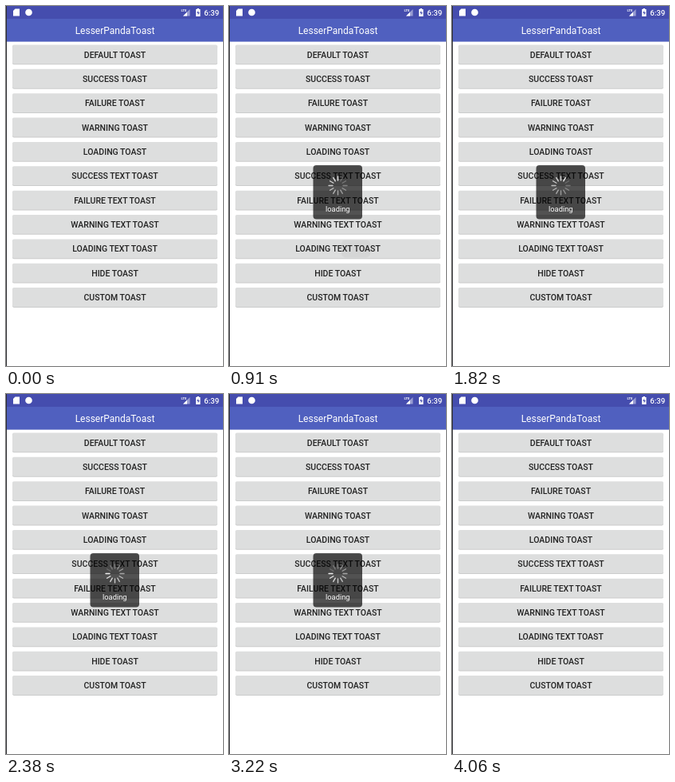
An HTML page for the animation above (4480 ms loop, 272 px wide and 450 px high).

```html
<!DOCTYPE html>
<html lang="en">
<head>
<meta charset="utf-8">
<title>LesserPandaToast</title>
<style>
  html, body { margin: 0; width: 100%; height: 100%; overflow: hidden; background: #fff; }
  svg { display: block; width: 100%; height: 100%; }
  text { font-family: Roboto, sans-serif; text-anchor: middle; }
  .label { font-size: 10.5px; font-weight: 500; fill: #222; }
  .light { fill: #fff; }
</style>
</head>
<body>
<svg viewBox="0 0 272 450">
  <defs>
    <filter id="lift" x="-5%" y="-30%" width="110%" height="170%">
      <feDropShadow dx="0" dy="1" stdDeviation="1.8" flood-color="#000" flood-opacity=".22"/>
    </filter>
  </defs>
  <rect width="272" height="450" fill="#fff"/>
  <rect width="272" height="44.600" fill="#5060bf"/>
  <rect width="272" height="16" fill="#454dae"/>
  <rect width="1" height="450" fill="#2a2a2e"/>

  <g class="light">
    <path d="M11.500 3.500h5.500v9H9V6z"/>
    <circle cx="28.500" cy="8" r="4.300"/>
    <path d="M222 12.500L230.500 4v8.500z" opacity=".45"/>
    <path d="M222 12.500L227 7.500v5z"/>
    <path d="M239.500 3h2.500v1h1.500v9h-5.500V4h1.500z"/>
    <path d="M241.200 5.500l-2 3.500h1.500v2.500l2-3.500h-1.500z" fill="#454dae"/>
    <text x="223" y="7.300" font-size="4.400" font-weight="700">LTE</text>
    <text x="257.800" y="11.700" font-size="9.600" font-weight="500">6:39</text>
    <text x="136.500" y="34.700" font-size="12">LesserPandaToast</text>
  </g>

  <g id="buttons"></g>
  <rect id="ripple" x="141" y="292.500" width="36" height="22" rx="5" fill="#000"/>

  <g id="toast">
    <rect x="105.500" y="199" width="61.500" height="67.600" rx="4" fill="#000" opacity=".68"/>
    <g id="spinner" stroke="#fff" stroke-width="1.400" stroke-linecap="round"></g>
    <text class="light" x="136.300" y="256.700" font-size="9.300">loading</text>
  </g>
</svg>
<script>
const LOOP = 4480, STEP = 70, SHOW = 910, HIDE = 3570, SPOKES = 12;
const $ = id => document.getElementById(id);

const labels = ["DEFAULT", "SUCCESS", "FAILURE", "WARNING", "LOADING", "SUCCESS TEXT",
  "FAILURE TEXT", "WARNING TEXT", "LOADING TEXT", "HIDE", "CUSTOM"];

$("buttons").innerHTML = labels.map((label, i) => `
  <g class="button" transform="translate(0 ${48.5 + i * 30.36})">
    <rect x="8" y="1" width="257" height="23.800" rx="1.800" fill="#cbcccc"/>
    <rect x="8" width="257" height="23.800" rx="1.800" fill="#dddede"/>
    <text class="label" x="136.500" y="16">${label} TOAST</text>
  </g>`).join("");

$("spinner").innerHTML = Array.from({ length: SPOKES }, (_, i) =>
  `<path d="M0-6.500V-11.500" transform="rotate(${i * 360 / SPOKES})" opacity="${0.2 + 0.7 * i / (SPOKES - 1)}"/>`
).join("");

const hideButton = document.querySelectorAll(".button")[labels.indexOf("HIDE")];
const within = (t, from, to) => t >= from && t < to;

function draw(now) {
  const t = Math.floor(now % LOOP / STEP) * STEP;
  const turn = 30 + (t - SHOW) / STEP * 360 / SPOKES;
  $("toast").style.display = within(t, SHOW, HIDE) ? "" : "none";
  $("spinner").setAttribute("transform", `translate(136.500 224.500) rotate(${turn % 360})`);
  $("ripple").setAttribute("opacity", within(t, SHOW, SHOW + STEP) ? 0.035 : 0);
  hideButton.setAttribute("filter", within(t, 3360, HIDE) ? "url(#lift)" : "none");
}

function tick() {
  draw(performance.now());
  requestAnimationFrame(tick);
}
tick();
</script>
</body>
</html>
```
